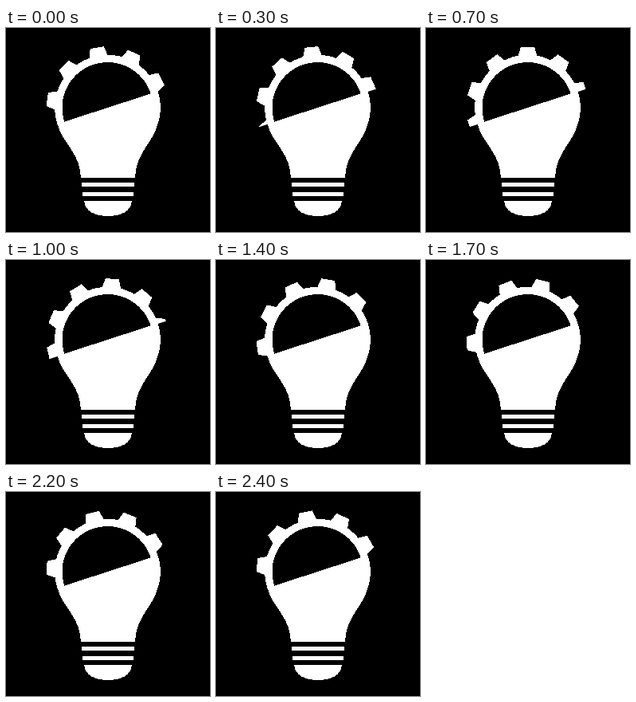
Animation of 256x256 px, one loop 2.5 s. Source, as an HTML page:

```html
<!DOCTYPE html>
<html lang="en">
<head>
<meta charset="utf-8">
<title>Gear bulb</title>
<style>
  html, body { margin: 0; width: 100%; height: 100%; overflow: hidden; background: #000; }
  svg { display: block; width: 100vw; height: 100vh; }
</style>
</head>
<body>
<svg viewBox="0 0 256 256" fill="#fff" shape-rendering="crispEdges">
  <defs>
    <!-- everything above the slanted cut -->
    <clipPath id="above">
      <rect x="-130" y="-130" width="260" height="130.4" transform="translate(127.5 100) rotate(-18)"/>
    </clipPath>
  </defs>
  <g clip-path="url(#above)">
    <g id="teeth"></g>
  </g>
  <circle cx="127.5" cy="100" r="66.3"/>
  <path d="M188 128C178.5 149 163 160 162 188H94C93 160 76.500 149 67 128Z"/>
  <path d="M-57 0A57 57 0 0 1 57 0Z" fill="#000" transform="translate(127.5 100) rotate(-18)"/>
  <rect x="95" y="194" width="66" height="5"/>
  <rect x="96" y="206" width="64" height="5"/>
  <path d="M98 217H158C156.500 230 145 236 128 236S99.500 230 98 217Z"/>
</svg>
<script>
  const LOOP = 2500, STEP = 100, COUNT = 10;
  const PITCH = 360 / COUNT;
  const START = -10.08;
  const teeth = document.getElementById("teeth");

  for (let i = 0; i < COUNT; i++) {
    const tooth = document.createElementNS("http://www.w3.org/2000/svg", "path");
    tooth.setAttribute("d", "M-12 -64L-8.5 -76.5H8.5L12 -64Z");
    tooth.setAttribute("transform", `rotate(${i * PITCH})`);
    teeth.append(tooth);
  }

  // The gear advances one tooth per loop, in held steps.
  function draw(now) {
    const held = Math.floor((now % LOOP) / STEP) * STEP;
    const angle = START + PITCH * held / LOOP;
    teeth.setAttribute("transform", `translate(127.5 100) rotate(${angle})`);
  }

  const begin = performance.now();
  function tick() {
    draw(performance.now() - begin);
    requestAnimationFrame(tick);
  }
  tick();
</script>
</body>
</html>
```
